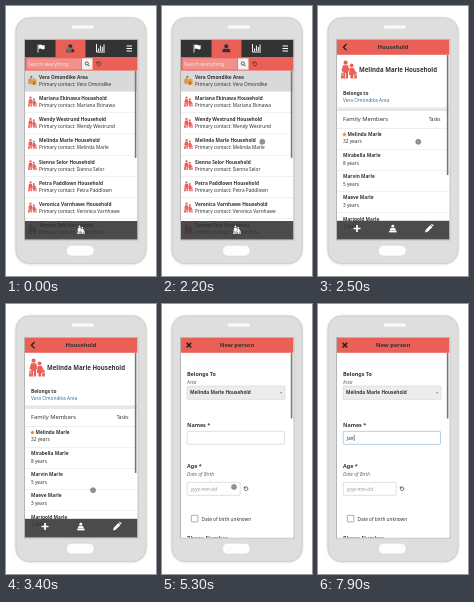
These frames come from a looping animation (150 by 270 pixels, 8 s). An HTML page:

```html
<!DOCTYPE html>
<html lang="en">
<head>
<meta charset="utf-8">
<title>Household app</title>
<style>
html, body { margin: 0; width: 100%; height: 100%; overflow: hidden; background: #fff; }
svg { display: block; width: 150px; height: 270px; }
text { font-family: "Noto Sans", "Open Sans", sans-serif; fill: #333; }
.b { font-weight: 700; }
.i { font-style: italic; fill: #666; }
</style>
</head>
<body>
<svg viewBox="0 0 150 270" xmlns="http://www.w3.org/2000/svg">
  <defs>
    <clipPath id="glass"><rect x="19" y="34" width="112.3" height="199.4"/></clipPath>
    <filter id="blur" x="-20%" y="-20%" width="140%" height="140%"><feGaussianBlur stdDeviation="1"/></filter>
    <symbol id="family" viewBox="0 0 16 18" overflow="visible">
      <circle cx="4.6" cy="2.1" r="2.1"/>
      <path d="M2 4.8h5.2l1.2 6H7V18H5v-5.5H4.2V18h-2v-7H.4z"/>
      <circle cx="10.6" cy="4.8" r="1.9"/>
      <path d="M8.6 7.3h4l2.4 4.8-1.2.6-1.2-1.8.8 3.6h-1.2V18H9.4v-3.5H8z"/>
      <circle cx="14.4" cy="12.6" r="1.3"/><path d="M13.2 14.3h2.6V18h-2.6z"/>
      <circle cx="1" cy="13.2" r="1"/><path d="M0 14.6h2V18H0z"/>
    </symbol>
    <symbol id="area" viewBox="0 0 16 19" overflow="visible">
      <path d="M0 8l4-4 4 4v8H0z" fill="#d5975c"/>
      <circle cx="6" cy="3" r="2" fill="#8c6b45"/>
      <path d="M6 9l5-4 5 4v9H6z" fill="#e1a43c"/>
      <path d="M9.5 12h3v6h-3z" fill="#a75a3e"/>
    </symbol>
    <symbol id="person" viewBox="0 0 8 8" overflow="visible">
      <circle cx="4" cy="2" r="2"/><path d="M0 8V6.6Q0 4.4 2.4 4.3L4 5l1.6-.7Q8 4.4 8 6.6V8z"/>
    </symbol>
    <symbol id="reload" viewBox="0 0 6 6" overflow="visible">
      <path d="M1.2 1.6A2.2 2.2 0 1 1 .8 3.7" fill="none" stroke="currentColor" stroke-width=".85"/>
      <path d="M.3.2v2.5h2.4z" fill="currentColor"/>
    </symbol>
  </defs>

  <rect x="9.5" y="11.8" width="131" height="246.6" rx="14" fill="#c4c4c4" opacity=".6" filter="url(#blur)"/>
  <rect x="9.5" y="11.5" width="131" height="246.5" rx="14" fill="#dedede"/>
  <rect x="10" y="12" width="130" height="245.5" rx="13.5" fill="none" stroke="#d0d0d0"/>
  <rect x="65.5" y="19.6" width="22.5" height="3" rx="1.5" fill="#fafafa"/>
  <rect x="60.5" y="239.3" width="27.5" height="10.7" rx="5" fill="#fdfdfd" stroke="#d0d0d0" stroke-width=".5"/>
  <rect x="18.5" y="33.5" width="113.3" height="200.4" fill="none" stroke="#b5b5b5"/>

  <g clip-path="url(#glass)">
    <rect x="19" y="34" width="113" height="200" fill="#fff"/>
    <g id="list"></g>
    <g id="home"></g>
    <g id="form"></g>
    <circle id="dot" r="2.7" fill="#777" stroke="#666" stroke-opacity=".4" stroke-width=".5"/>
  </g>
</svg>
<script>
const $ = id => document.getElementById(id);
const RED = '#ea5f56', DARK = '#333';
const LEAD = 'Melinda Marle', AREA = 'Vera Omondike';

const text = (x, y, s, size = 4.75, cls = '', more = '') =>
  `<text x="${x}" y="${y}" font-size="${size}" class="${cls}" ${more}>${s}</text>`;
const box = (x, y, w, h, fill, more = '') =>
  `<rect x="${x}" y="${y}" width="${w}" height="${h}" fill="${fill}" ${more}/>`;
const icon = (name, x, y, w, h, color) =>
  `<use href="#${name}" x="${x}" y="${y}" width="${w}" height="${h}" fill="${color}" color="${color}"/>`;
const stroke = (d, color, w) =>
  `<path d="${d}" fill="none" stroke="${color}" stroke-width="${w}"/>`;
const header = title => box(19, 34, 113, 14.8, RED) +
  text(75, 43.2, title, 5.8, 'b', 'text-anchor="middle"');
const bar = y => box(19, y, 113, 234 - y, DARK, 'fill-opacity=".88"');
const scroll = (y, h) => box(128.8, y, 1.6, h, '#777', 'rx=".6"');

function drawList() {
  const rows = [AREA, 'Mariana Ekinawa', 'Wendy Westrund', LEAD, 'Sienna Selor',
    'Petra Paddlown', 'Veronica Varnhawe', 'Tamsin Tole'];
  let s = box(19, 34, 113, 17, DARK) + box(49.5, 34, 30, 17, RED) + box(19, 51, 113, 13.8, RED);
  s += stroke('M32 38.5V46.5', '#fff', .8) + '<path d="M32.6 39q1.5-.8 3 0t3 0v4q-1.5.8-3 0t-3 0z" fill="#fff"/>';
  s += icon('person', 60.3, 38.3, 8, 8, DARK);
  s += stroke('M90.5 38V46H99M92.5 45V42.5M94.4 45V39.5M96.3 45V41M98 45V38.5', '#fff', 1);
  s += stroke('M120.5 40H126M120.5 42.5H126M120.5 45H126', '#fff', 1.1);
  s += box(20.5, 52.3, 55, 11.3, '#f0918b') + text(22, 59.8, 'Search everything', 4.8, '', 'style="fill:#fbe3e1"');
  s += box(76, 52.3, 10.5, 11.3, '#f3f3f3');
  s += '<circle cx="80.8" cy="57.5" r="1.6" fill="none" stroke="#333" stroke-width=".75"/>' + stroke('M82 58.8L83.5 60.3', '#333', .9);
  s += icon('reload', 90.3, 55.2, 5.2, 5.2, DARK);
  s += box(19, 64.8, 113, 20.6, '#d9d9d9');
  rows.forEach((name, i) => {
    const y = 72.8 + i * 21.2;
    s += icon(i ? 'family' : 'area', 22, y - 3.5, 8.8, 10, RED);
    s += text(33, y, name + (i ? ' Household' : ' Area'), 4.75, 'b');
    s += text(33, y + 7, 'Primary contact: ' + name);
    s += box(19, y + 12.6, 113, .4, '#dcdcdc');
  });
  s += scroll(65, 87) + bar(215) + icon('family', 71.3, 219, 7.5, 9.5, '#fff');
  $('list').innerHTML = s;
}

function drawHome() {
  const kin = [[LEAD, 32], ['Mirabella Marle', 8], ['Marvin Marle', 5],
    ['Maeve Marle', 3], ['Marigold Marle', 1]];
  let s = box(19, 34, 113, 200, '#fff') + header('Household');
  s += stroke('M28.6 38L25.4 41.2L28.6 44.4', '#222', 1.3);
  s += icon('family', 23, 54.3, 16, 18.5, RED);
  s += text(41, 66.4, LEAD + ' Household', 6.1, 'b');
  s += text(25, 88.8, 'Belongs to', 4.8, 'b') + text(25, 95.8, AREA + ' Area', 4.8, '', 'style="fill:#3774ad"');
  s += box(19, 101.5, 113, 3.5, '#e6e6e6');
  s += text(25, 115.3, 'Family Members', 5.8) + text(122.5, 115.2, 'Tasks', 4.7, '', 'text-anchor="end"');
  s += box(19, 122, 113, .5, '#dcdcdc');
  kin.forEach(([name, age], i) => {
    const y = 130 + i * 21.15;
    if (!i) s += '<path d="M26.4 126.2l.7 1.4 1.6.2-1.2 1.1.3 1.6-1.4-.8-1.4.8.3-1.6-1.2-1.1 1.6-.2z" fill="#eb8a35"/>';
    s += text(i ? 25 : 29.5, y, name, 4.75, 'b') + text(25, y + 7.4, age + (age > 1 ? ' years' : ' year'));
    s += box(19, y + 13.2, 113, .4, '#dcdcdc');
  });
  s += scroll(49, 120) + bar(214.8) + stroke('M39 219V226M35.5 222.5H42.5', '#fff', 1.7);
  s += icon('person', 72, 218.8, 5.6, 5.6, '#fff') + box(71.2, 224.6, 7.4, 1.8, '#fff');
  s += '<path d="M107 226.5l.7-2.7 4.7-4.7 2 2-4.7 4.7zM113 218.5l.8-.8 2 2-.8.8z" fill="#fff"/>';
  $('home').innerHTML = s;
}

function drawForm() {
  const field = (x, y, w, id = '') =>
    box(x, y, w, 13, '#fff', `id="${id}" rx=".8" stroke="#ccc" stroke-width=".6"`);
  let s = box(19, 34, 113, 200, '#fff') + header('New person');
  s += stroke('M24.6 38.9L29.2 43.5M29.2 38.9L24.6 43.5', '#222', 1.5);
  s += text(25, 72, 'Belongs To', 5.4, 'b') + text(25, 79.6, 'Area', 4.7, 'i');
  s += box(25, 82, 98, 13.4, '#ececec', 'rx=".8" stroke="#cfcfcf" stroke-width=".5"');
  s += text(28, 90.4, LEAD + ' Household', 4.75, 'b') + '<path d="M118 88.2h2.4l-1.2 1.4z" fill="#777"/>';
  s += text(25, 123, 'Names *', 5.4, 'b') + field(25.2, 127.3, 97.3, 'name');
  s += text(28.6, 135.6, '', 4.8, '', 'id="typed"') + box(29, 130.7, .5, 6.3, '#222', 'id="caret"');
  s += text(25, 164, 'Age *', 5.4, 'b') + text(25, 171.7, 'Date of Birth', 4.8, 'i');
  s += field(25.2, 178.3, 53, 'born') + text(29, 186.6, 'yyyy-mm-dd', 4.8, 'i', 'style="fill:#999"');
  s += icon('reload', 81.6, 182.2, 5, 5, '#333');
  s += box(29.3, 211.3, 6.6, 6.6, '#fff', 'rx=".6" stroke="#777" stroke-width=".6"');
  s += text(39.5, 216.8, 'Date of birth unknown', 4.7);
  s += text(25, 236, 'Phone Number', 5.4, 'b');
  s += scroll(49, 65.5);
  $('form').innerHTML = s;
}

// Pointer stops: time, x, y
const path = [[0, 63, 43.8], [1000, 63, 43.8], [1900, 100.3, 135.8], [2800, 100.3, 135.8],
  [3900, 77, 224.5], [4700, 77, 224.5], [5300, 72, 183], [6100, 60, 137], [8000, 60, 137]];

function pointer(t) {
  let k = 0;
  while (k < path.length - 2 && t >= path[k + 1][0]) k++;
  const [t0, x0, y0] = path[k], [t1, x1, y1] = path[k + 1];
  const u = (t - t0) / (t1 - t0), e = u * u * (3 - 2 * u);
  return [x0 + (x1 - x0) * e, y0 + (y1 - y0) * e];
}

const show = (id, on) => $(id).setAttribute('display', on ? 'inline' : 'none');

function draw(t) {
  show('list', t < 2400);
  show('home', t >= 2400 && t < 4600);
  show('form', t >= 4600);
  const [x, y] = pointer(t);
  $('dot').setAttribute('cx', x);
  $('dot').setAttribute('cy', y);
  $('dot').setAttribute('fill-opacity', t >= 3900 && t < 4700 ? .5 : .8);
  show('dot', t < 7400);

  const focus = t >= 6400;
  $('name').setAttribute('stroke', focus ? '#7fb2dc' : '#ccc');
  const typed = 'Jan'.slice(0, t < 7500 ? 0 : 1 + Math.floor((t - 7500) / 200));
  if ($('typed').textContent !== typed) $('typed').textContent = typed;
  const width = typed ? $('typed').getComputedTextLength() : 0;
  $('caret').setAttribute('x', 28.9 + width);
  show('caret', focus && (t >= 7500 || (t - 6400) % 1000 < 500));
}

drawList();
drawHome();
drawForm();
const start = performance.now();
function tick() {
  const t = (performance.now() - start) % 8000;
  draw(Math.floor(t / 100) * 100);
  requestAnimationFrame(tick);
}
draw(0);
requestAnimationFrame(tick);
</script>
</body>
</html>
```
